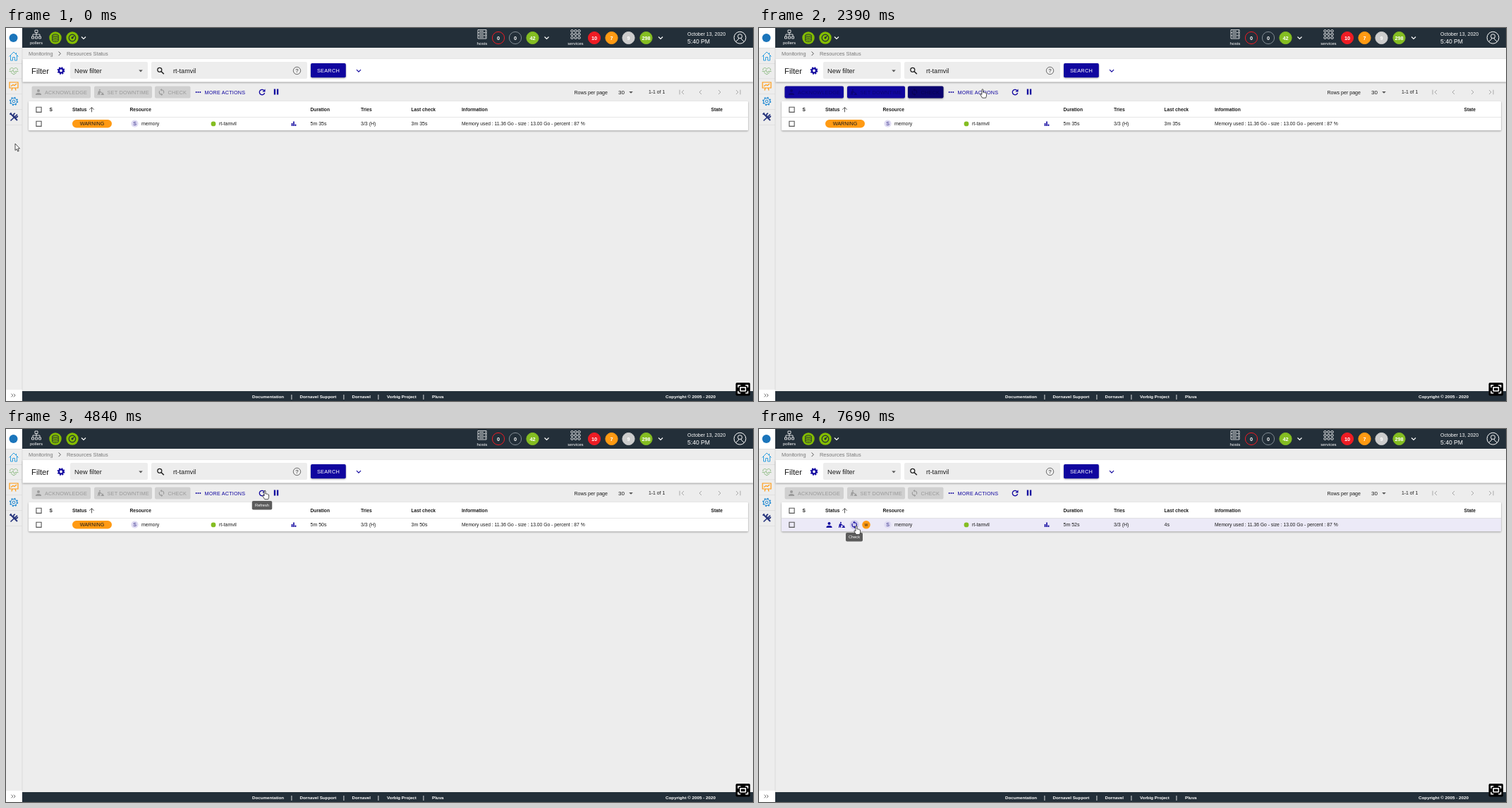
Write an HTML page that moves like this. It is 1059 px wide and 529 px high and loops after 8000 ms.

```html
<!DOCTYPE html>
<html lang="en">
<head>
<meta charset="utf-8">
<title>Resources Status</title>
<style>
  html, body { margin: 0; width: 100%; height: 100%; overflow: hidden; background: #ededed; }
  svg { display: block; width: 100%; height: 100%; }
  text { font-family: "Liberation Sans", Arial, sans-serif; white-space: pre; }
  .paper { filter: drop-shadow(0 1px 1px rgba(0, 0, 0, .35)); }
  .line { fill: none; stroke: currentColor; }
  .solid { fill: currentColor; }
</style>
</head>
<body>
<svg id="stage" viewBox="0 0 1059 529" preserveAspectRatio="none"></svg>
<script>
const LOOP = 8000, NAVY = '#10069f', DARK = '#232f39', GREEN = '#84bd00', ORANGE = '#ff9a13', INK = '#1a1a1a';

// Markup helpers; text is placed by the middle of its capitals.
const text = (x, cy, size, str, fill = INK, more = '') =>
  `<text x="${x}" y="${cy + size * .36}" font-size="${size}" fill="${fill}" ${more}>${str}</text>`;
const bold = (x, cy, size, str, fill, more = '') => text(x, cy, size, str, fill, 'font-weight="700" ' + more);
const mid = 'text-anchor="middle"';
const rect = (x, y, w, h, fill, more = '') =>
  `<rect x="${x}" y="${y}" width="${w}" height="${h}" fill="${fill}" ${more}/>`;
const disc = (x, y, r, fill, more = '') => `<circle cx="${x}" cy="${y}" r="${r}" fill="${fill}" ${more}/>`;
const at = (x, y, color, body, more = '') =>
  `<g transform="translate(${x} ${y})" style="color:${color}" ${more}>${body}</g>`;
const line = (d, w = 1) => `<path class="line" d="${d}" stroke-width="${w}"/>`;
const solid = d => `<path class="solid" d="${d}"/>`;
const ring = (x, y, r, w = 1) => `<circle class="line" cx="${x}" cy="${y}" r="${r}" stroke-width="${w}"/>`;
const chevron = (x, y, color, s = 3) => at(x, y, color, line(`M${-s} ${-s / 2}L0 ${s / 2}L${s} ${-s / 2}`, 1.2));
const caret = (x, y) => at(x, y, '#555', solid('M-2.8-1.4H2.8L0 1.4Z'));

const icon = {
  person: solid('M-2-2a2 2 0 1 0 4 0a2 2 0 1 0-4 0M-4 4V3C-4 1.5-1.5 1 0 1S4 1.5 4 3V4Z'),
  worker: solid('M-2.6-3.2a1 1 0 1 0 2 0a1 1 0 1 0-2 0M-4.6 4L-3.6-1.6-1.2-1.8 1.4.6 1 1.4-1.4 0-1.2 4H-2.2L-2.6 1.5-3.6 4ZM0 4L2.6 0 4.6 4Z'),
  sync: line('M0-3.3A3.3 3.3 0 0 1 2.8 1.7M0 3.3A3.3 3.3 0 0 1-2.8-1.7', 1.1) +
    solid('M.2-5.2V-1.4L-1.9-3.3ZM-.2 5.2V1.4L1.9 3.3Z'),
  refresh: line('M2.6-2.6A3.7 3.7 0 1 0 3.6 1', 1.3) + solid('M4.5-4.5V-.4H.4Z'),
  gear: ring(0, 0, 3, 2.2) + `<circle class="line" r="4.5" stroke-width="1.8" stroke-dasharray="1.9 1.634"/>`,
  thinGear: ring(0, 0, 1.9) + ring(0, 0, 4.5) +
    `<circle class="line" r="5.4" stroke-width="1.6" stroke-dasharray="1.9 2.341"/>`,
  bars: solid('M-3.3-.9H-1.6V3.3H-3.3ZM-.8-3.4H.8V3.3H-.8ZM1.6.6H3.3V3.3H1.6Z'),
  up: line('M0 3.5V-3M-3.2 0L0-3.2 3.2 0', .9)
};

const box = (id, y) => at(46.5, y, '#555', line('M-3.6-3.6H3.6V3.6H-3.6Z', 1.1)) +
  at(46.5, y, NAVY, rect(-4.2, -4.2, 8.4, 8.4, NAVY, 'rx="1"') +
    '<path d="M-2.7 0L-.8 1.9 2.9-1.8" fill="none" stroke="#fff" stroke-width="1.1"/>', `id="${id}"`);

const button = (i, x, w, glyph, label) =>
  rect(x, 82.5, w, 17, '#000', 'rx="2" opacity=".12"') +
  rect(x, 82.5, w, 17, NAVY, `rx="2" id="fill${i}" class="paper"`) +
  `<g class="label">` + `<g transform="translate(${x + 9.5} 91)">${icon[glyph]}</g>` +
  text(x + 18.5, 91, 7.35, label, 'currentColor', 'letter-spacing=".2"') + '</g>';

const counter = (x, n, fill, stroke = fill) =>
  disc(x, 14, 8.6, fill, `stroke="${stroke}" stroke-width="1"`) + bold(x, 14.2, 7.3, n, '#fff', mid);

const tip = (id, x, y, w, label) => `<g id="${id}">` +
  rect(x - w / 2, y - 6, w, 12.4, '#5c5c5c', 'rx="2"') + text(x, y + .3, 5.7, label, '#fff', mid) + '</g>';

const heads = [[94, 'Status', 20], [175.5, 'Resource', 31], [431.5, 'Duration', 27], [503, 'Tries', 17],
  [574.5, 'Last check', 35], [646, 'Information', 37], [999.5, 'State', 17]];

const footer = [[349, 'Documentation'], [416.5, 'Dornavel Support'], [490.5, 'Dornavel'],
  [540, 'Vorbig Project'], [604, 'Pluva']];

const topBar = rect(23, 0, 1036, 28, DARK) +
  at(43, 9, '#fff', line('M-2-6H2V-2.5H-2ZM0-2.5V2M-5 3V0H5V3M-6.5 3H-3.5V6H-6.5ZM-1.5 3H1.5V6H-1.5ZM3.5 3H6.5V6H3.5Z', .8)) +
  text(43, 20.5, 6.2, 'pollers', '#fff', mid) +
  disc(70, 14, 8.7, GREEN) +
  at(70, 14, DARK, '<ellipse class="line" cy="-3.5" rx="4.3" ry="1.6"/>' +
    line('M-4.3-3.5V4C-4 6 4 6 4.3 4V-3.5M-4.3-1C-4 1 4 1 4.3-1M-4.3 1.5C-4 3.5 4 3.5 4.3 1.5', .9)) +
  disc(94, 14, 8.7, GREEN) + at(94, 14, DARK, ring(0, 0, 4.8, 1.2) + line('M0 0L2.6-2.6', 1.2) + disc(0, 0, 1.4, DARK)) +
  chevron(110, 14, '#fff') +
  at(675, 9, '#fff', line('M-6-6.5H6V6H-6ZM-6-2.4H6M-6 1.8H6M-4-4.5H2M-4-.3H2M-4 3.9H2M4-4.5H5M4-.3H5M4 3.9H5', .8)) +
  text(675, 21.5, 6.2, 'hosts', '#fff', mid) +
  counter(698, 0, DARK, '#ed1c24') + counter(722, 0, DARK, '#818b93') + counter(746.5, 42, '#84bd22') +
  chevron(766.5, 14, '#fff') +
  [-5, 0, 5].map(x => [-4.8, 0, 4.8].map(y => at(807.5 + x, 9 + y, '#fff', ring(0, 0, 1.7, .9))).join('')).join('') +
  text(807.5, 21.5, 6.1, 'services', '#fff', mid) +
  counter(834, 10, '#ed1c24') + counter(858.5, 7, ORANGE) + counter(882.5, 9, '#cdcdcd') + counter(907.5, 298, '#84bd22') +
  chevron(928, 14, '#fff') +
  text(966, 8.3, 7, 'October 13, 2020', '#fff') + text(966, 19, 8.6, '5:40 PM', '#fff') +
  at(1040.5, 13.7, '#fff', ring(0, 0, 8.4) + ring(0, -2, 3) + line('M-5.8 6C-5 3.5-2 3.6-1.6 .7M5.8 6C5 3.5 2 3.6 1.6 .7'));

const sideBar = rect(0, 0, 23, 529, '#ededed') + rect(0, 0, 23, 28, '#fff') +
  [28, 50, 71.5, 93, 115, 137].map(y => rect(0, y, 23, .7, '#dcdcdc')).join('') +
  rect(22.6, 28, .8, 487, '#d8d8d8') + disc(10.5, 14, 6, '#1b75bb') +
  at(11, 40, '#2f9fe0', line('M-6.5 .5L0-6 6.5 .5M-4.5-1V6H-1.5V1.5H1.5V6H4.5V-1M3.5-5V-2.5')) +
  at(11, 61, '#8fbc85', line('M-5.3-1C-6-5-1.5-5.5 0-2.6 1.5-5.5 6-5 5.3-1M-4 2L0 5 4 2M-6.5 .6H-2.5L-1.2-1.5 .6 2.3 2 .6H6.5')) +
  at(11, 82.5, ORANGE, line('M-6-5.5H6V2.5H-6ZM-3 6L-2 2.5M3 6L2 2.5M-4 0L-1-2 1-1 4-3.5', 1.2)) +
  at(11, 104, '#1e88d2', icon.thinGear) +
  at(11, 126, '#27357d', line('M-5-5L5 5M-5.6-3.4L-3.4-5.6', 2) + line('M5-3.5L-4.5 5.5M2-5A3 3 0 1 0 5.5-1.5', 1.7)) +
  rect(0, 513, 23, 16, '#fff') + at(10.5, 521, '#555', line('M-3-2.3L-.7 0-3 2.3M.3-2.3L2.6 0 .3 2.3', .9));

const filterBar = text(32, 36.5, 7.4, 'Monitoring', '#777') + at(76, 36.3, '#555', line('M-1.4-2.8L1.4 0-1.4 2.8')) +
  text(86, 36.5, 7.45, 'Resources Status', '#777') +
  rect(23.5, 44, 1036, 32.5, '#fff', 'class="paper"') + text(36, 60.5, 11.3, 'Filter') + at(78, 60.5, NAVY, icon.gear) +
  rect(91, 48, 110, 24, '#ededed', 'rx="2"') + text(97, 60.3, 9.3, 'New filter') + caret(191, 61) +
  rect(206, 48, 221, 24, '#ededed', 'rx="2"') + at(219, 60.5, '#222', ring(-1.2, -1.2, 3, 1.3) + line('M1 1L4.8 4.8', 1.6)) +
  text(237, 60.3, 9.1, 'rt-tamvil') + at(412.5, 60.5, '#666', ring(0, 0, 5.2)) + bold(412.5, 60.5, 7.5, '?', '#666', mid) +
  rect(432, 50, 49.8, 20.3, NAVY, 'rx="2" class="paper"') +
  text(457, 60.5, 7.4, 'SEARCH', '#fff', mid + ' letter-spacing=".2"') + chevron(500, 60.6, NAVY);

const actions = button(0, 36.5, 83.5, 'person', 'ACKNOWLEDGE') + button(1, 125, 82, 'worker', 'SET DOWNTIME') +
  button(2, 211, 50.5, 'sync', 'CHECK') +
  '<clipPath id="inCheck"><rect x="211" y="82.5" width="50.5" height="17" rx="2"/></clipPath>' +
  disc(237, 90, 0, '#fff', 'id="pressRipple" clip-path="url(#inCheck)"') +
  [269.7, 272.5, 275.3].map(x => disc(x, 91, 1, NAVY)).join('') +
  text(281.5, 91, 7.25, 'MORE ACTIONS', NAVY, 'letter-spacing=".18"') +
  disc(363, 91, 0, NAVY, 'id="refreshRipple"') + at(363, 91, NAVY, icon.refresh) +
  at(383, 90.5, NAVY, solid('M-3.2-4H-.9V4H-3.2ZM.9-4H3.2V4H.9Z')) +
  text(805.5, 91, 7.05, 'Rows per page') + text(868, 91, 8, '30') + caret(886, 91.3) + text(911, 91, 6.85, '1-1 of 1') +
  at(958, 91, '#a8a8a8', line('M-3-3.3V3.3M3-3L0 0 3 3')) + at(984.5, 91, '#a8a8a8', line('M1.5-3L-1.5 0 1.5 3')) +
  at(1011.5, 91, '#a8a8a8', line('M-1.5-3L1.5 0-1.5 3')) + at(1038, 91, '#a8a8a8', line('M3-3.3V3.3M-3-3L0 0-3 3')) +
  `<g id="progress">${rect(32, 76.5, 1021, 2.6, '#b5b1e0')}<rect id="runner" y="76.5" height="2.6" fill="${NAVY}"/></g>`;

const table = rect(32, 104, 1020, 41.3, '#fff', 'rx="1" class="paper"') + rect(32, 126.3, 1020, 18.7, '#eceaf7', 'id="hover"') +
  rect(32, 126, 1020, .6, '#d5d5d5') + box('allOn', 115.8) + box('rowOn', 135.8) + bold(61.5, 115.5, 6.6, 'S') +
  heads.map(([x, label], i) => bold(x, i == 6 ? 115.2 : 115.7, 6.7, label, INK, `id="head${i}"`)).join('') + at(121.5, 115.8, '#444', icon.up) +
  `<g id="pill">${rect(94, 130, 56, 11.4, ORANGE, 'rx="5.7"')}${text(122, 135.8, 7.2, 'WARNING', INK, mid)}</g>` +
  '<g id="quick">' + at(99.5, 136, NAVY, icon.person) + at(117.5, 136, NAVY, icon.worker) +
  disc(135.3, 135.8, 0, NAVY, 'id="iconRipple"') + at(135.2, 135.8, NAVY, icon.sync) +
  disc(152, 135.8, 5.8, ORANGE) + text(152, 135.8, 5.2, 'W', INK, mid) + '</g>' +
  disc(182.5, 135.6, 5.1, '#dedaf2') + text(182.5, 135.7, 7, 'S', '#2a2380', mid) +
  text(192, 135.7, 7, 'memory') + disc(294, 135.9, 3.4, '#84bd22') + text(302, 135.7, 7, 'rt-tamvil') + at(408, 135.8, NAVY, icon.bars) +
  text(431.5, 135.7, 7, '', INK, 'id="duration"') + text(503, 135.7, 7, '3/3 (H)') + text(574.5, 135.7, 7, '', INK, 'id="last"') +
  text(646, 135.7, 6.76, 'Memory used : 11.36 Go - size : 13.00 Go - percent : 87 %');

const bottom = rect(23, 515, 1036, 14, DARK) + footer.map(([x, label]) => bold(x, 522.8, 6.2, label, '#fff')).join('') +
  [405, 479, 528, 592].map(x => bold(x, 522.5, 6.5, '|', '#fff', mid)).join('') +
  bold(935, 522.8, 6.25, 'Copyright © 2005 - 2020', '#fff') +
  rect(1034.5, 503, 20.5, 18.5, '#000', 'rx="2"') +
  at(1044.8, 512.3, '#fff', line('M-6.8-2.5V-5.5H-3.5M3.5-5.5H6.8V-2.5M6.8 2.5V5.5H3.5M-3.5 5.5H-6.8V2.5', 1.5) + line('M-3.6-2.5H3.6V2.5H-3.6Z', 1.6));

const toast = `<g id="toast">${rect(462.5, 485.3, 134, 30.7, GREEN, 'rx="2"')}` +
  at(477.5, 500.3, '#fff', line('M4.6-1A4.7 4.7 0 1 1 2.4-4M-2.2-.6L-.2 1.5 4.6-3.4', 1.1)) +
  text(490, 500.7, 7.13, 'Check command sent', '#fff') + at(579, 500.8, '#fff', line('M-2.6-2.6L2.6 2.6M2.6-2.6L-2.6 2.6', 1.1)) + '</g>';

const cursor = '<g id="cursor" fill="#fff" stroke="#222" stroke-width=".8" stroke-linejoin="round">' +
  '<path id="arrow" d="M0 0V9.5L2.2 7.6 3.7 11 5.2 10.4 3.8 7H6.6Z"/>' +
  '<path id="hand" d="M-1 7V1Q0-.5 1 1V5Q2 4.4 2.8 5.3 3.8 4.9 4.4 5.8 5.6 5.6 5.6 6.8V9.5Q5.4 11 4.6 12.7H-.2Q-2.6 9.4-3.2 7.6-2.6 6.2-1 7.9Z"/></g>';

const stage = document.getElementById('stage');
stage.innerHTML = rect(0, 0, 1059, 529, '#ededed') + sideBar + topBar + filterBar + actions + table + bottom + toast +
  tip('refreshTip', 363, 108, 28.5, 'Refresh') + tip('checkTip', 135, 153, 24, 'Check') + cursor;

const $ = id => document.getElementById(id);
const show = (id, on) => { $(id).style.display = on ? '' : 'none'; };
const set = (id, attrs) => { for (const k in attrs) $(id).setAttribute(k, attrs[k]); };
const ramp = (t, a, b) => Math.min(1, Math.max(0, (t - a) / (b - a)));
const ease = p => p * p * (3 - 2 * p);
const labels = stage.querySelectorAll('.label');

// Pointer moves: start, end, target x, target y, sideways bow.
const moves = [[100, 600, 46, 137, 0], [930, 1345, 237, 88, 22], [2260, 2487, 367, 87, -1],
  [5520, 5850, 590, 140, 0], [6250, 6960, 138, 137, 29]];

function pointer(t) {
  let x = 13, y = 164;
  for (const [a, b, tx, ty, bow] of moves) {
    const p = ease(ramp(t, a, b));
    x += (tx - x) * p;
    y += (ty - y) * p + bow * Math.sin(Math.PI * p);
  }
  return [x, y];
}

function ripple(id, t, start, length, radius, peak) {
  const p = ramp(t, start, start + length);
  set(id, { r: radius * Math.min(1, .35 + p), opacity: p > 0 && p < 1 ? peak * Math.min(1, 2 * (1 - p)) : 0 });
}

function draw(t) {
  const [x, y] = pointer(t);
  const inRow = x > 32 && y > 126 && y < 145.5;
  const selected = t >= 900 && t < 2380;
  const onButton = selected && y > 82 && y < 100 && x > 36 && x < 262;
  const onLink = y > 82 && y < 100 && x > 266 && x < 373;
  let onHead = false;
  heads.forEach(([hx, , w], i) => {
    const over = i < 6 && x > hx && x < hx + w && y > 110 && y < 121;
    onHead = onHead || over;
    set('head' + i, { fill: over ? '#858585' : INK });
  });

  set('cursor', { transform: `translate(${x} ${y})` });
  const hand = inRow || onButton || onLink || onHead;
  show('hand', hand);
  show('arrow', !hand);

  show('hover', inRow);
  show('quick', inRow);
  show('pill', !inRow);
  show('rowOn', selected);
  show('allOn', selected);

  const enabled = ramp(t, 900, 1120) * (1 - ease(ramp(t, 2400, 2640)));
  for (let i = 0; i < 3; i++) set('fill' + i, { opacity: enabled });
  const dim = ease(ramp(t, 1320, 1580));
  set('fill2', { fill: `rgb(${16 - 5 * dim},${6 - 2 * dim},${159 - 48 * dim})` });
  for (const l of labels) l.style.color = selected ? '#fff' : 'rgba(0,0,0,.26)';

  ripple('pressRipple', t, 1720, 220, 30, .25);
  if (t < 3300) ripple('refreshRipple', t, 2930, 250, 10, .2);
  else ripple('refreshRipple', t, t < 4500 ? 3460 : 4850, 300, 10, .2);
  const held = ramp(t, 7300, 7690);
  set('iconRipple', { r: 6.5 * held, opacity: .13 });

  const load = t < 4500 ? ramp(t, 3470, 3930) : ramp(t, 4860, 5150);
  show('progress', load > 0 && load < 1);
  const left = 1021 * Math.max(0, load * 1.5 - .5), right = 1021 * Math.min(1, load * 1.5);
  set('runner', { x: 32 + left, width: right - left });

  $('duration').textContent = t < 3760 ? '5m 35s' : t < 5100 ? '5m 50s' : '5m 52s';
  $('last').textContent = t < 3760 ? '3m 35s' : t < 5100 ? '3m 50s' : '4s';

  const grown = ease(ramp(t, 2600, 2830)) * (1 - ease(ramp(t, 3640, 3840)));
  const s = .75 + .25 * grown;
  set('toast', { opacity: grown, transform: `translate(529.5 500.6) scale(${s} ${s * s}) translate(-529.5 -500.6)` });

  show('refreshTip', t > 2480 && t < 5620);
  set('refreshTip', { opacity: ramp(t, 2580, 2780) * (1 - ramp(t, 5530, 5620)) });
  show('checkTip', t > 6880);
  set('checkTip', { opacity: ramp(t, 6880, 7000) });
}

function tick(now) {
  draw(now % LOOP);
  requestAnimationFrame(tick);
}
draw(0);
requestAnimationFrame(tick);
</script>
</body>
</html>
```
